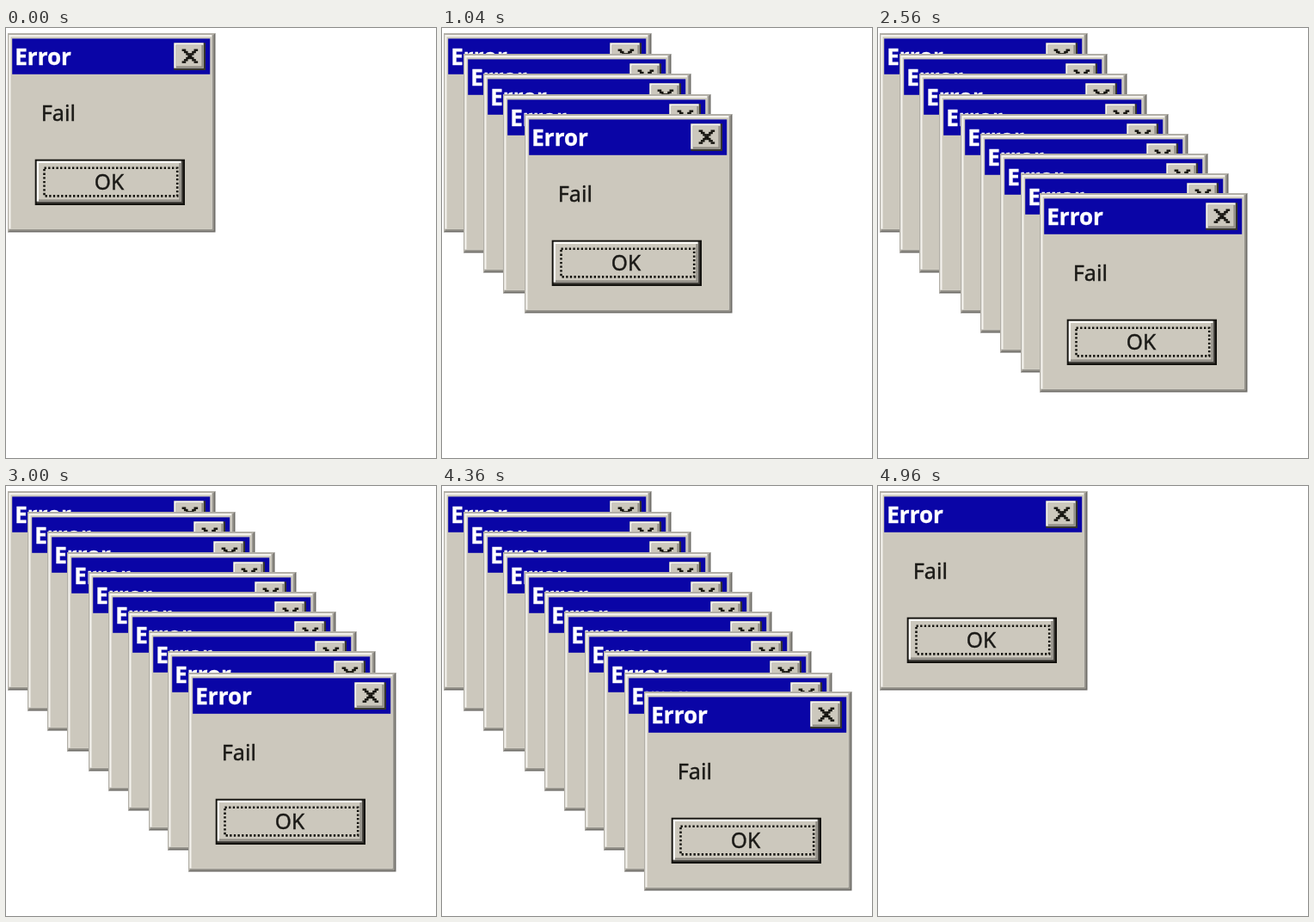
Write an HTML page that moves like this. It is 500x500 px and loops after 5 s.

```html
<!DOCTYPE html>
<html lang="en">
<head>
<meta charset="utf-8">
<title>Error windows</title>
<style>
  html, body { margin: 0; width: 100%; height: 100%; overflow: hidden; background: #fff; }
  svg { display: block; width: 100vw; height: 100vh; }
  text { font-family: "Noto Sans", "Open Sans", sans-serif; stroke-width: 0.4; }
  .label { fill: #1b1a17; stroke: #1b1a17; }
  .title { fill: #fff; stroke: #fff; font-weight: 700; }
</style>
</head>
<body>
<svg id="stage" viewBox="0 0 500 500">
  <defs>
    <g id="dialog">
      <!-- frame -->
      <rect x="2" y="6" width="241.5" height="231.5" fill="#6f6d68"/>
      <path d="M2 6H243.5L241.5 8V235.5H4L2 237.5Z" fill="#b2afa7"/>
      <path d="M239.5 9V233.5H4V235.5H241.5V8Z" fill="#98958d"/>
      <rect x="3.3" y="8" width="236.2" height="225.7" fill="#f4f2ed"/>
      <rect x="5.5" y="10.3" width="234" height="223.4" fill="#ccc8bd"/>

      <!-- title bar -->
      <rect x="7.2" y="12.4" width="230" height="41.4" fill="#0a05a6"/>
      <text class="title" x="10.3" y="42.8" font-size="26">Error</text>

      <!-- close button -->
      <rect x="195.3" y="17.3" width="36.7" height="31.7" fill="#35342f"/>
      <rect x="195.3" y="17.3" width="34.4" height="29.4" fill="#f8f7f2"/>
      <rect x="197.6" y="19.6" width="32.1" height="27.1" fill="#8f8c84"/>
      <rect x="197.6" y="19.6" width="29.8" height="24.8" fill="#ccc8bd"/>
      <g id="cross" fill="#15140f"/>

      <text class="label" x="40.8" y="108" font-size="25.2">Fail</text>

      <!-- default button -->
      <rect x="33.7" y="152.7" width="174.3" height="53.3" fill="#14130f"/>
      <rect x="35.7" y="154.7" width="170" height="49" fill="#4a4843"/>
      <rect x="35.7" y="154.7" width="168" height="47" fill="#fbfaf6"/>
      <rect x="38" y="157" width="165.7" height="44.7" fill="#8f8c84"/>
      <rect x="38" y="157" width="163.4" height="42.4" fill="#ccc8bd"/>
      <rect x="44.5" y="162.7" width="154.7" height="32.7" fill="none" stroke="#15140f"
            stroke-width="2.6" stroke-dasharray="2.32"/>
      <text class="label" x="102.8" y="187.5" font-size="24.6">OK</text>
    </g>
  </defs>
</svg>
<script>
const SVG = "http://www.w3.org/2000/svg";
const LOOP = 5000;

const offsets = [
  [0, 0], [23, 24], [46, 47], [69, 71], [94, 94], [117, 117],
  [140, 140], [164, 163], [186, 186], [210, 211], [233, 233], [256, 257]
];
const openTimes = [0, 120, 400, 720, 1040, 1360, 1720, 2080, 2560, 3000, 3400, 3760];
const closeTimes = [4360, 4400, 4440, 4520, 4560, 4640, 4680, 4760, 4840, 4920, 4960];

function add(parent, name, attributes) {
  const node = document.createElementNS(SVG, name);
  for (const key in attributes) node.setAttribute(key, attributes[key]);
  return parent.appendChild(node);
}

// Stepped diagonals of the close mark, 8 by 7 cells.
const cell = 2.32;
const cross = document.getElementById("cross");
for (let row = 0; row < 7; row++) {
  const inset = Math.min(row, 6 - row);
  for (const column of [inset, 6 - inset]) {
    add(cross, "rect", {
      x: 204.6 + column * cell, y: 24.5 + row * cell,
      width: cell * 2, height: cell + 0.1
    });
  }
}

const stage = document.getElementById("stage");
const dialogs = offsets.map(([x, y]) => add(stage, "use", { href: "#dialog", x, y }));

function draw(time) {
  const passed = times => times.filter(start => start <= time).length;
  const count = passed(openTimes) - passed(closeTimes);
  dialogs.forEach((dialog, i) => {
    dialog.style.display = i < count ? "" : "none";
  });
}

function tick() {
  draw(performance.now() % LOOP);
  requestAnimationFrame(tick);
}

draw(0);
requestAnimationFrame(tick);
</script>
</body>
</html>
```
